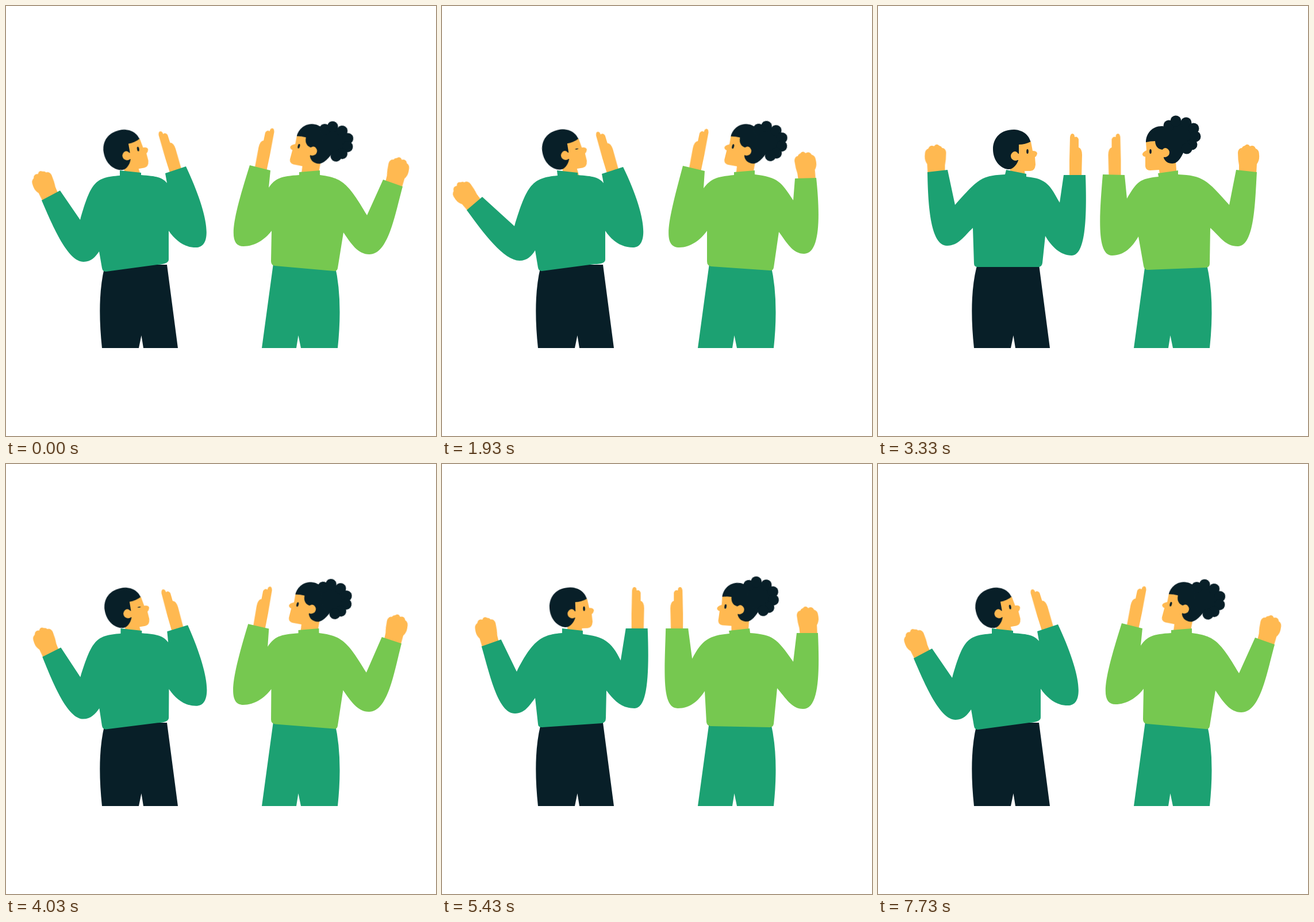
An HTML page without scripts that plays this animation: 748 px wide and 748 px high, repeating every 7.81 s.

```html
<!DOCTYPE html>
<html lang="en">
<head>
<meta charset="utf-8">
<title>High five</title>
<style>
html, body { margin: 0; width: 100%; height: 100%; overflow: hidden; background: #fff; }
svg { display: block; width: 100%; height: 100%; }
.dark { fill: #081f28; }
.green { fill: #1ca172; }
.lime { fill: #76c850; }
.skin { fill: #ffb951; }

/* One high-five cycle; the negative delay starts it in the wind-up. */
.move { animation: 3.905s -2.572s infinite cubic-bezier(.55, 0, .45, 1); }
.eye { transform-box: fill-box; transform-origin: center; animation-timing-function: step-end; }

.man .sweater { animation-name: man-sweater; }
.man .head { animation-name: man-head; }
.man .palm { animation-name: man-palm; }
.man .fist { animation-name: man-fist; }
.man .eye { animation-name: man-blink; }
.woman .sweater { animation-name: woman-sweater; }
.woman .head { animation-name: woman-head; }
.woman .bun { animation-name: woman-bun; }
.woman .palm { animation-name: woman-palm; }
.woman .fist { animation-name: woman-fist; }
.woman .eye { animation-name: woman-blink; }

@keyframes man-sweater {
  0%, 90%, 100% { d: path("M224,285 L222,293 C182,295 178,300 140,344 L136,285 L101,289 C100,335 98,415 125,415 C142,415 151,400 165,386 L167,448 Q167,454 174,454 L279,454 Q285,454 286,447 L291,400 C302,419 318,434 338,434 C361,434 366,375 364,294 L326,294 L320,344 C303,314 296,300 259,297 L259,292 Z"); animation-timing-function: ease-in; }
  4.9% { d: path("M209,286 L209,294 C176,297 159,303 130,361 L103,305 L69,317 C84,370 98,434 127,434 C144,434 152,420 162,407 L167,452 Q167,458 174,458 L278,451 Q285,450 285,442 L286,394 C300,412 312,425 335,425 C357,425 361,370 358,286 L320,286 L311,342 C295,308 280,300 245,296 L245,290 Z"); animation-timing-function: ease-out; }
  15.3% { d: path("M200,286 L201,295 C157,299 148,310 126,383 L70,332 L43,355 C72,395 108,443 135,443 C148,443 156,435 162,425 L167,455 Q168,461 174,461 L265,449 Q284,449 284,441 L284,391 C295,408 312,420 332,420 C362,420 354,360 315,280 L278,292 L281,308 C273,298 263,296 236,294 L236,290 Z"); }
  29.8%, 82% { d: path("M227,285 L225,293 C190,294 180,300 136,346 L122,285 L87,288 C90,340 92,416 123,416 C143,416 150,403 168,386 L167,447 Q167,453 174,453 L279,456 Q285,456 286,450 L292,400 C303,420 320,436 337,436 C362,436 372,380 375,301 L341,295 L323,353 C305,312 300,300 260,297 L261,292 Z"); }
  41%, 51.1% { d: path("M223,285 L221,293 C180,295 175,300 134,346 L121,285 L86,289 C87,340 90,417 120,417 C140,417 150,400 165,386 L167,448 Q167,454 174,454 L279,454 Q285,454 286,447 L291,400 C302,419 318,434 337,434 C360,434 364,375 361,294 L323,294 L316,342 C300,314 295,300 258,297 L258,292 Z"); }
  64.2%, 66% { d: path("M198,286 L198,295 C155,298 148,306 129,372 L94,321 L62,338 C82,385 108,445 135,445 C148,445 156,436 162,427 L167,456 Q168,462 174,462 L263,450 Q283,449 283,441 L283,391 C295,408 310,420 330,420 C362,420 351,360 313,279 L277,291 L280,308 C272,298 262,296 235,294 L235,290 Z"); }
}
@keyframes man-head {
  0%, 90%, 100% { transform: translate(239px, 261px) rotate(0deg); animation-timing-function: ease-in; }
  4.9% { transform: translate(225.5px, 260.5px) rotate(-2deg); animation-timing-function: ease-out; }
  15.3% { transform: translate(214px, 260px) rotate(-9deg); }
  29.8%, 82% { transform: translate(243.5px, 261px) rotate(1deg); }
  41%, 51.1% { transform: translate(238px, 261px) rotate(0deg); }
  64.2%, 66% { transform: translate(209.5px, 260.5px) rotate(-10deg); }
}
@keyframes man-palm {
  0%, 90%, 100% { transform: translate(347px, 294px) rotate(0deg); animation-timing-function: ease-in; }
  4.9% { transform: translate(341px, 286px) rotate(0deg); animation-timing-function: ease-out; }
  15.3% { transform: translate(297px, 286px) rotate(-17deg); }
  29.8%, 82% { transform: translate(362px, 299px) rotate(9deg); }
  41%, 51.1% { transform: translate(344px, 294px) rotate(0deg); }
  64.2%, 66% { transform: translate(295px, 285px) rotate(-17.5deg); }
}
@keyframes man-fist {
  0%, 90%, 100% { transform: translate(118.5px, 287px) rotate(0deg); animation-timing-function: ease-in; }
  4.9% { transform: translate(86px, 311px) rotate(-13deg); animation-timing-function: ease-out; }
  15.3% { transform: translate(56.5px, 343.5px) rotate(-37deg); }
  29.8%, 82% { transform: translate(103.5px, 286.5px) rotate(0deg); }
  41%, 51.1% { transform: translate(103.5px, 287px) rotate(0deg); }
  64.2%, 66% { transform: translate(78px, 329.5px) rotate(-23deg); }
}

@keyframes woman-sweater {
  0%, 90%, 100% { d: path("M522,286 L522,293 C563,295 570,302 607,345 L618,285 L654,288 C653,340 653,417 625,417 C604,417 596,402 578,386 L577,448 Q577,454 571,455 L469,459 Q463,459 462,452 L453,401 C442,420 428,434 407,434 C380,434 383,365 388,293 L426,294 L430,337 C449,306 455,300 488,297 L487,291 Z"); animation-timing-function: ease-in; }
  4.9% { d: path("M535,286 L536,294 C575,297 582,302 611,344 L617,294 L654,294 C657,365 656,426 628,426 C608,426 598,407 583,390 L577,452 Q576,458 570,458 L468,456 Q461,456 460,449 L457,395 C446,412 432,425 410,425 C382,425 387,365 389,286 L428,286 L435,339 C452,306 465,298 500,295 L499,290 Z"); animation-timing-function: ease-out; }
  15.3% { d: path("M544,286 L544,293 C585,298 590,306 611,338 L614,300 L651,299 C658,365 658,431 630,431 C610,431 600,412 586,393 L577,455 Q576,461 570,460 L468,453 Q461,452 461,444 L461,391 C450,407 432,420 413,420 C382,420 393,375 419,278 L457,287 L455,317 C468,300 478,297 508,294 L508,289 Z"); }
  29.8%, 82% { d: path("M515,286 L517,294 C555,295 568,300 605,342 L613,283 L650,282 C652,355 650,413 622,413 C600,413 592,398 575,384 L576,446 Q576,452 570,453 L470,461 Q464,461 462,454 L451,402 C442,420 428,438 407,438 C380,438 372,370 371,300 L409,297 L422,350 C440,310 450,300 482,297 L481,291 Z"); }
  41%, 51.1% { d: path("M522,286 L522,293 C565,295 572,302 611,346 L623,285 L659,289 C656,340 655,418 626,418 C604,418 596,402 578,386 L577,448 Q577,454 571,455 L469,459 Q463,459 462,452 L453,401 C442,420 428,434 407,434 C380,434 385,365 391,293 L429,294 L433,335 C450,306 455,300 488,297 L487,291 Z"); }
  64.2%, 66% { d: path("M546,286 L546,294 C585,299 595,308 628,364 L656,302 L690,314 C676,365 665,432 632,432 C612,432 600,413 587,394 L577,456 Q576,462 570,461 L468,452 Q461,451 461,444 L462,391 C450,407 432,418 413,418 C385,418 393,375 424,277 L460,286 L457,316 C468,300 478,296 510,294 L510,289 Z"); }
}
@keyframes woman-head {
  0%, 90%, 100% { transform: translate(500px, 255px) rotate(0deg); animation-timing-function: ease-in; }
  4.9% { transform: translate(518.5px, 253.5px) rotate(8deg); animation-timing-function: ease-out; }
  15.3% { transform: translate(531px, 252.5px) rotate(14deg); }
  29.8%, 82% { transform: translate(493.5px, 256px) rotate(-1deg); }
  41%, 51.1% { transform: translate(500px, 255px) rotate(0deg); }
  64.2%, 66% { transform: translate(534px, 252.5px) rotate(15deg); }
}
@keyframes woman-bun {
  0%, 29.8%, 41%, 51.1%, 82%, 100% { transform: none; }
  4.9% { transform: translate(3px, 3px); }
  15.3%, 64.2%, 66% { transform: translate(4px, 5px); }
}
@keyframes woman-palm {
  0%, 90%, 100% { transform: translate(408px, 294px) rotate(0deg); animation-timing-function: ease-in; }
  4.9% { transform: translate(408px, 286px) rotate(0deg); animation-timing-function: ease-out; }
  15.3% { transform: translate(440px, 283px) rotate(12deg); }
  29.8%, 82% { transform: translate(388px, 299px) rotate(-6deg); }
  41%, 51.1% { transform: translate(411.5px, 294px) rotate(0deg); }
  64.2%, 66% { transform: translate(443px, 282px) rotate(12deg); }
}
@keyframes woman-fist {
  0%, 90%, 100% { transform: translate(636px, 287px) rotate(-1deg); animation-timing-function: ease-in; }
  4.9% { transform: translate(635.5px, 294px) rotate(-6deg); animation-timing-function: ease-out; }
  15.3% { transform: translate(632.5px, 299.5px) rotate(-8deg); }
  29.8%, 82% { transform: translate(631.5px, 282.5px) rotate(-8deg); }
  41%, 51.1% { transform: translate(641px, 287px) rotate(0deg); }
  64.2%, 66% { transform: translate(673px, 308px) rotate(13deg); }
}

@keyframes man-blink {
  0%, 17.2%, 70.6%, 100% { transform: none; }
  14%, 67.6% { transform: scale(1.5, .2); }
}
@keyframes woman-blink {
  0%, 90.6%, 100% { transform: none; }
  87.5% { transform: scale(1.5, .2); }
}
</style>
</head>
<body>
<svg viewBox="0 0 748 748">
  <defs>
    <path id="palm" class="skin" d="M-11,6 L-11,-25 L-10,-66 Q-9,-72 -6,-72 Q-2,-72 -2,-66 Q3,-68 5,-62 L5,-48 Q11,-46 11,-35 L10,6 Z"/>
    <path id="fist" class="skin" d="M-17,6 L-18,-12 Q-23,-19 -22,-28 Q-22,-37 -16,-39 Q-13,-46 -6,-43 Q-2,-49 3,-44 Q7,-43 8,-40 Q14,-40 15,-32 Q15,-20 13,-10 V6 Z"/>
    <path id="ear" class="skin" d="M9,-4 L6,-4 Q2,-10 -3,-7 Q-9,-3 -6,4 Q-1,10 5,7 L9,7 Z"/>
    <circle id="curl" r="9.5"/>
  </defs>

  <g class="man">
    <path class="dark" d="M173,450 H280 L299,595 H239 L235.500,573 L231,595 H167 Q158,510 171,456 Z"/>
    <g class="move palm"><use href="#palm"/></g>
    <g class="move fist"><use href="#fist"/></g>
    <g class="move head">
      <path class="skin" d="M4,-22 L28,-25 L31,-9 Q39,-9 39,-4 Q38,0 35,2 L36,15 Q35,26 27,26 H17 L19,42 H-9 L-7,0 Z"/>
      <path class="dark" d="M27.500,-25 C23,-41 8,-46 -2,-46 C-24,-46 -38,-32 -38,-12 C-38,6 -27,21 -12,23 C-3,24 5,14 7,4 V-20 Q18,-20 27.500,-25 Z"/>
      <use href="#ear"/>
      <ellipse class="move eye dark" cx="22" cy="-8" rx="1.800" ry="4"/>
    </g>
    <path class="move sweater green"/>
  </g>

  <g class="woman">
    <path class="green" d="M465,448 L572,450 Q586,510 577,595 H513 L508.500,573 L505,595 H445 Z"/>
    <g class="move palm"><use href="#palm" transform="scale(-1 1)"/></g>
    <g class="move fist"><use href="#fist" transform="scale(-1 1)"/></g>
    <g class="move head">
      <path class="skin" d="M-34,-19 L-33,-4 Q-41,0 -40,4 Q-38,8 -35,7 V24 Q-34,31 -27,31 L-11,30 L-9,46 H20 L18,14 L0,-22 Z"/>
      <g class="dark">
        <path d="M-34,-18 C-34,-34 -22,-47 -5,-46 L25,-40 L34,-6 C28,8 22,19 12,19 C4,19 -1,15 -3,9 V-5 Q-17,-5 -18,-20 Q-26,-20 -34,-18 Z"/>
        <g class="move bun">
          <circle cx="30" cy="-31" r="24"/>
          <use href="#curl" x="6" y="-47"/>
          <use href="#curl" x="18" y="-55"/>
          <use href="#curl" x="36" y="-52"/>
          <use href="#curl" x="49" y="-42"/>
          <use href="#curl" x="52" y="-28"/>
          <use href="#curl" x="46" y="-14"/>
          <use href="#curl" x="37" y="-7"/>
        </g>
      </g>
      <use href="#ear" transform="scale(-1 1)"/>
      <ellipse class="move eye dark" cx="-26" cy="-2" rx="1.800" ry="4"/>
    </g>
    <path class="move sweater lime"/>
  </g>
</svg>
</body>
</html>
```
